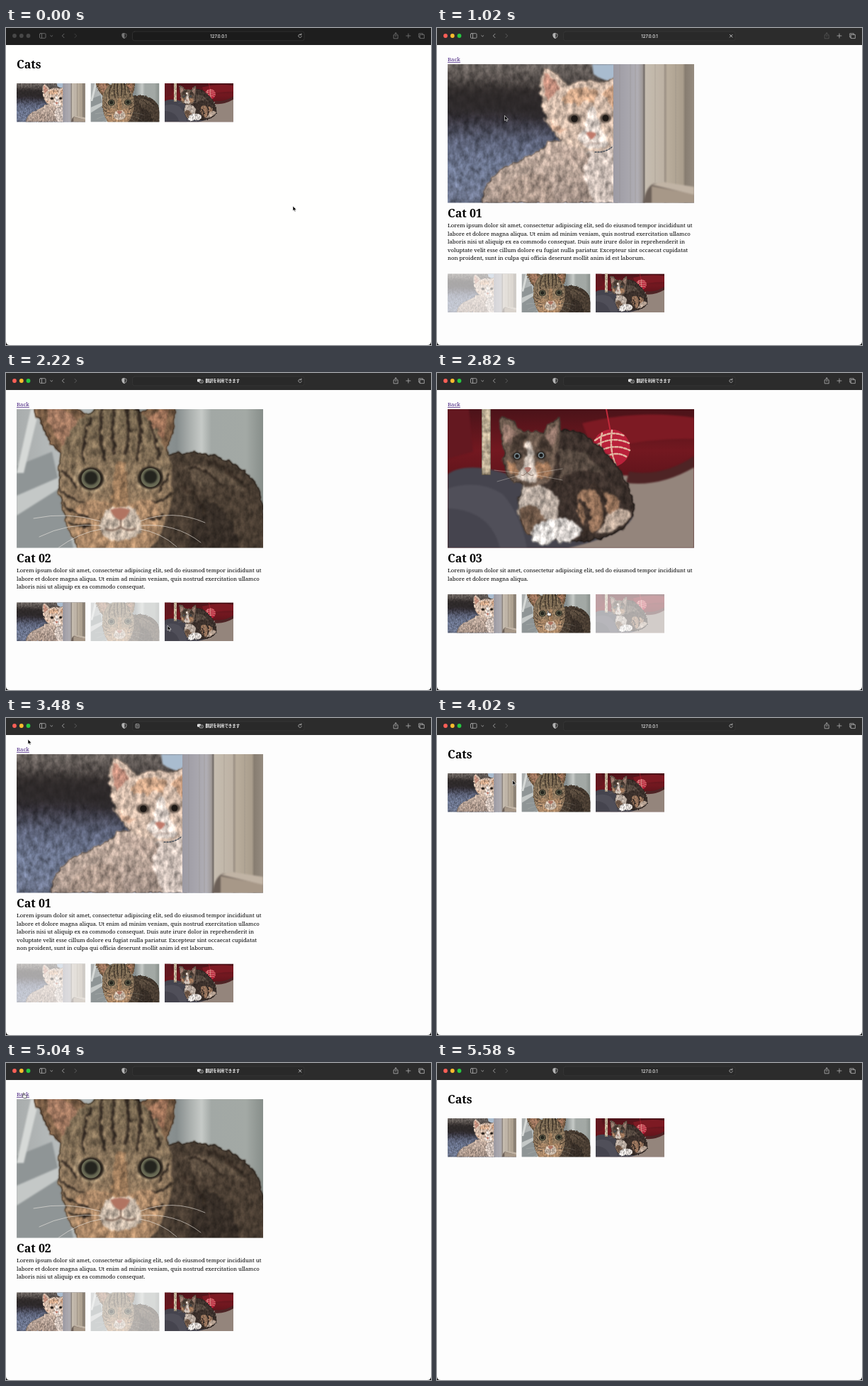
Write an HTML page that moves like this. It is 600 px wide and 447 px high and loops after 5640 ms.

```html
<!DOCTYPE html>
<html lang="en">
<head>
<meta charset="utf-8">
<title>Cats</title>
<style>
  html, body { margin: 0; width: 100%; height: 100%; overflow: hidden; background: #111; }
  svg { display: block; width: 100vw; height: 100vh; }
  filter { color-interpolation-filters: sRGB; }
  .page { font: 7.8px "Noto Serif", "Liberation Serif", serif; fill: #000; }
  .page .h { font-size: 16px; font-weight: 600; }
  .page .back { fill: #46217f; text-decoration: underline; }
  .bar { fill: none; stroke: #b4b4b4; stroke-width: .8; stroke-linecap: round; stroke-linejoin: round; }
  .bar text { fill: #f2f2f2; stroke: none; text-anchor: middle; font: 500 6px Inter, "Liberation Sans", sans-serif; }
  .bar .jp { font: 700 5.4px "Noto Sans CJK JP", "Noto Sans CJK", sans-serif; text-anchor: start; }
  .line { fill: none; stroke-linecap: round; }
</style>
</head>
<body>
<svg viewBox="0 0 600 447" preserveAspectRatio="none">
  <defs>
    <filter id="soft" x="-10%" y="-10%" width="120%" height="120%"><feGaussianBlur stdDeviation="1.3"/></filter>
    <filter id="haze" x="-20%" y="-20%" width="140%" height="140%"><feGaussianBlur stdDeviation="6"/></filter>
    <!-- Ragged edges and a light and dark mottle, like fur. -->
    <filter id="fur" x="-5%" y="-5%" width="110%" height="110%">
      <feTurbulence type="fractalNoise" baseFrequency=".13 .09" numOctaves="3" seed="4" result="noise"/>
      <feColorMatrix in="noise" values="1 0 0 0 0  1 0 0 0 0  1 0 0 0 0  0 0 0 0 1" result="gray"/>
      <feDisplacementMap in="SourceGraphic" in2="noise" scale="9" xChannelSelector="R" yChannelSelector="G"/>
      <feGaussianBlur stdDeviation="1.1" result="shape"/>
      <feComposite in="shape" in2="gray" operator="arithmetic" k1=".9" k2=".55"/>
    </filter>
    <linearGradient id="yard" x2="0" y2="1">
      <stop offset="0" stop-color="#7b7470"/><stop offset=".1" stop-color="#615a56"/>
      <stop offset=".22" stop-color="#3a3433"/><stop offset=".4" stop-color="#35323a"/>
      <stop offset=".55" stop-color="#5a6076"/><stop offset=".7" stop-color="#6c7690"/>
      <stop offset="1" stop-color="#6a7289"/>
    </linearGradient>
    <linearGradient id="wall">
      <stop offset="0" stop-color="#9c9aa3"/><stop offset=".3" stop-color="#b0aeb4"/>
      <stop offset=".36" stop-color="#a09a98"/><stop offset=".38" stop-color="#716a66"/>
      <stop offset=".4" stop-color="#c6bdb0"/><stop offset=".62" stop-color="#bdb2a4"/>
      <stop offset=".64" stop-color="#9c9185"/><stop offset=".67" stop-color="#b9ad9c"/>
      <stop offset=".86" stop-color="#aa9e8d"/><stop offset=".89" stop-color="#877d71"/>
      <stop offset="1" stop-color="#968c80"/>
    </linearGradient>
    <linearGradient id="coat" x2="0" y2="1">
      <stop offset="0" stop-color="#c9b3a5"/><stop offset="1" stop-color="#a08e84"/>
    </linearGradient>
    <linearGradient id="pane">
      <stop offset="0" stop-color="#a9adad"/><stop offset=".2" stop-color="#b9bebe"/>
      <stop offset=".65" stop-color="#868d8d"/><stop offset=".7" stop-color="#a8adab"/>
      <stop offset=".75" stop-color="#c6cac7"/><stop offset=".79" stop-color="#a2a8a5"/>
      <stop offset=".93" stop-color="#a3a9a5"/><stop offset="1" stop-color="#878e8a"/>
    </linearGradient>
    <linearGradient id="tabby" x2="0" y2="1">
      <stop offset="0" stop-color="#75664f"/><stop offset=".5" stop-color="#88735a"/>
      <stop offset="1" stop-color="#a48263"/>
    </linearGradient>
    <linearGradient id="sofa" x2="0" y2="1">
      <stop offset="0" stop-color="#4b1319"/><stop offset=".3" stop-color="#731820"/>
      <stop offset=".55" stop-color="#5a131a"/><stop offset="1" stop-color="#3d1216"/>
    </linearGradient>

    <symbol id="cat1" viewBox="0 0 348 195.5" preserveAspectRatio="none">
      <rect x="-10" y="-10" width="368" height="216" fill="url(#yard)" filter="url(#fur)"/>
      <path d="M0 34Q70 28 150 44V84Q70 62 0 72Z" fill="#2a2626" opacity=".7" filter="url(#haze)"/>
      <path d="M204 0H236V26Q216 22 206 14Z" fill="#a9bccf" filter="url(#soft)"/>
      <g filter="url(#fur)">
        <path d="M46 196C50 164 78 144 104 134C126 125 138 118 142 108L240 106V196Z" fill="url(#coat)"/>
        <path d="M196 118L240 112V196H208Q184 154 196 118Z" fill="#cdbfb7"/>
        <path d="M70 196Q82 160 122 152Q152 156 150 196" fill="#ad988a" opacity=".6"/>
        <path d="M134 62C129 36 130 12 136 3C148 6 160 18 168 30C186 20 206 20 218 28Q228 20 236 20V112C222 126 206 126 190 120C162 114 140 96 134 62Z" fill="#d2baa9"/>
        <path d="M136 12Q152 20 160 35Q148 42 141 54Q134 34 136 12Z" fill="#bd8a79"/>
        <path d="M162 44Q182 27 212 36L206 60Q198 42 184 60Q174 50 162 58Z" fill="#c9a184"/>
        <path d="M220 40Q230 28 236 30V62Q224 56 220 40Z" fill="#cba184"/>
        <path d="M142 72Q152 92 170 92Q158 102 150 94Z" fill="#c6a18a"/>
        <path d="M198 62Q206 58 210 66L216 92Q230 102 224 114Q206 124 188 112Q178 102 194 92Z" fill="#ded2ca"/>
        <path d="M142 112Q168 124 200 126L198 140Q160 136 142 112Z" fill="#b49f93"/>
      </g>
      <g fill="#5a4d44" filter="url(#soft)"><ellipse cx="178.500" cy="77" rx="9" ry="7"/><ellipse cx="223" cy="76" rx="8" ry="6.500"/></g>
      <g fill="#1e1916"><circle cx="179" cy="77" r="4.800"/><circle cx="223" cy="76" r="4.500"/></g>
      <g filter="url(#soft)">
        <path d="M195 97Q203 93 210 98Q206 106 202 106Z" fill="#c07a6b"/>
        <path class="line" d="M202 106V110Q196 115 190 112M202 110Q208 114 215 111" stroke="#a78c80"/>
      </g>
      <path class="line" d="M208 124Q222 125 232 117" stroke="#4c535d" stroke-width="1.500" stroke-dasharray="2 2"/>
      <rect x="234" width="114" height="196" fill="url(#wall)"/>
      <path class="line" d="M243 0V196M258 0V196M265 0V196M293 0V166M322 0V170" stroke="#887f7a" stroke-width=".6" opacity=".5"/>
      <g filter="url(#soft)">
        <path d="M276 196Q280 172 292 168L348 174V196Z" fill="#6c6058"/>
        <path d="M288 172L348 183V196H288Z" fill="#a79888"/>
        <path d="M288 170L304 166L348 173V184Z" fill="#c1b4a5"/>
      </g>
    </symbol>

    <symbol id="cat2" viewBox="0 0 348 195.5" preserveAspectRatio="none">
      <rect width="348" height="196" fill="url(#pane)"/>
      <g filter="url(#soft)">
        <path d="M0 80L50 60L80 196H0Z" fill="#8f9596"/>
        <path d="M0 122L60 96V112L0 150Z" fill="#c4c8c7"/>
        <path d="M20 0H32L10 90H0Z" fill="#d6d9d7"/>
      </g>
      <g filter="url(#fur)">
        <path d="M206 66C260 50 318 70 342 112Q352 150 352 206H190Z" fill="#493d32"/>
        <path d="M238 80Q290 72 326 120Q298 98 262 112Z" fill="#5c4e40"/>
        <path d="M254 128Q300 124 318 206H240Z" fill="#372e27"/>
        <path d="M64 66Q32 34 24 -10H62Q92 -2 110 20Z" fill="#7b5f47"/>
        <path d="M66 50Q44 28 40 -6H58Q82 10 92 24Z" fill="#a0775f"/>
        <path d="M164 12Q190 -6 222 -10Q228 30 206 70Z" fill="#7b5f47"/>
        <path d="M180 14Q198 2 212 0Q214 32 200 50Z" fill="#a0745a"/>
        <path d="M62 64C70 24 106 -6 140 -8C176 -6 206 32 218 76C226 124 214 164 184 206H94C66 170 52 112 62 64Z" fill="url(#tabby)"/>
        <path d="M84 136Q116 120 145 140Q176 122 200 132Q208 168 180 206H98Q76 164 84 136Z" fill="#a98666"/>
        <path d="M122 150Q134 132 147 134Q162 132 172 150Q182 168 168 180Q148 192 124 180Q110 168 122 150Z" fill="#c9b9a9"/>
        <path d="M140 76Q146 70 154 76L158 138H132Z" fill="#9c7a5a"/>
        <path d="M80 88Q106 74 128 96Q126 118 104 118Q84 112 80 88Z" fill="#9c876b"/>
        <path d="M168 94Q188 74 212 84Q212 110 188 116Q168 114 168 94Z" fill="#9c876b"/>
        <g class="line" stroke="#352b23" stroke-width="4.500">
          <path d="M122 0Q114 38 124 72M138 -4Q132 34 139 62M154 -4Q162 34 154 62M170 0Q180 38 170 70"/>
          <path d="M104 12Q92 42 94 74M188 18Q200 48 200 70" stroke-width="4"/>
          <path d="M64 88Q78 94 84 112M62 112Q74 128 92 130M66 134Q80 150 100 152M216 92Q206 104 202 116M220 116Q208 130 194 130M76 160Q90 166 104 164M206 150Q196 158 186 154" stroke-width="3"/>
          <path d="M244 82Q272 84 286 106M270 74Q300 82 320 108M232 108Q258 118 266 150" stroke-width="4"/>
        </g>
      </g>
      <g fill="#2b241d" filter="url(#soft)"><ellipse cx="105" cy="98" rx="18" ry="16"/><ellipse cx="189" cy="96.500" rx="18" ry="16"/></g>
      <g fill="#696a54"><circle cx="105" cy="98" r="13.500"/><circle cx="189" cy="96.500" r="13.500"/></g>
      <g fill="#24241e" filter="url(#soft)"><circle cx="105" cy="97" r="9.500"/><circle cx="189" cy="95.500" r="9.500"/></g>
      <g filter="url(#soft)">
        <path d="M132 142Q146 136 160 142Q156 154 147 157Q137 154 132 142Z" fill="#b17461"/>
        <path class="line" d="M147 156V166Q136 174 126 169M147 166Q158 174 168 168" stroke="#73594b" stroke-width="2"/>
      </g>
      <g class="line" stroke="#eee9e2" stroke-width=".8" opacity=".75">
        <path d="M118 158Q72 144 24 154M118 164Q72 160 32 180M120 169Q88 174 58 196M174 158Q220 140 266 160M176 164Q224 160 260 188M174 169Q204 174 226 194"/>
      </g>
    </symbol>

    <symbol id="cat3" viewBox="0 0 348 195.5" preserveAspectRatio="none">
      <rect width="348" height="196" fill="url(#sofa)"/>
      <g filter="url(#soft)">
        <path d="M190 20Q270 0 348 12V42Q280 40 206 60Z" fill="#7d1a23"/>
        <path d="M230 92Q300 100 348 72V196H130Z" fill="#94857c"/>
        <path d="M256 88Q304 96 348 66V82Q300 110 252 104Z" fill="#4e2425"/>
        <path d="M0 0H30L36 60L0 70Z" fill="#641820"/>
        <path d="M0 92C22 74 70 84 96 96L262 150Q254 176 170 196H0Z" fill="#45444e"/>
        <path d="M0 112Q44 98 78 120Q104 150 112 196H74Q60 142 0 140Z" fill="#504f59"/>
      </g>
      <g filter="url(#fur)">
        <path d="M49 -4L60 88" class="line" stroke="#a99980" stroke-width="40"/>
        <path d="M49 -4L60 88" fill="none" stroke="#c6b79e" stroke-width="41" stroke-dasharray="5 2.500"/>
      </g>
      <path d="M224 0L230 32" class="line" stroke="#c1293a" stroke-width="2"/>
      <circle cx="231" cy="55" r="26.500" fill="#b9213a"/>
      <g class="line" stroke="#e2b5a0" stroke-width="2.500" stroke-dasharray="4 2.500">
        <path d="M208 44Q230 28 250 38M205 54Q230 36 256 48M206 64Q232 46 257 58M212 73Q236 56 254 68"/>
        <path d="M218 34Q212 56 226 79M232 30Q228 58 238 80"/>
      </g>
      <g filter="url(#fur)">
        <path d="M136 36C172 20 202 34 224 64C250 86 266 120 262 150C250 180 202 190 150 186C110 184 96 156 100 124Z" fill="#3b302b"/>
        <path d="M156 56Q202 54 222 94Q184 76 160 100Z" fill="#574a41"/>
        <path d="M184 116Q220 104 244 132Q240 162 204 174Q178 158 184 116Z" fill="#95725a"/>
        <path d="M206 108Q230 126 218 172M188 130Q204 146 194 174" class="line" stroke="#3a2e28" stroke-width="7"/>
        <path d="M226 148Q256 132 260 150Q244 172 212 176Z" fill="#b9a596"/>
        <path d="M104 106Q144 104 158 130L150 180Q108 178 98 144Z" fill="#b5a89e"/>
        <path d="M100 138Q128 128 140 160L134 186Q102 180 100 138Z" fill="#6f5848"/>
        <path d="M118 168Q150 144 164 164Q158 190 130 192Q114 184 118 168Z" fill="#e2dedb"/>
        <path d="M154 154Q184 152 188 172Q182 190 156 188Q146 170 154 154Z" fill="#dad4d0"/>
        <path d="M80 60Q72 28 76 10Q94 16 104 32Q122 28 134 34Q148 14 158 12Q162 42 152 68Q156 98 132 108Q108 114 90 100Q72 84 80 60Z" fill="#6b594d"/>
        <path d="M79 19Q91 23 98 37L84 50Q76 34 79 19ZM155 22Q156 42 148 54L138 40Q146 24 155 22Z" fill="#94776b"/>
        <path d="M92 40Q102 32 110 36L106 58L88 62ZM132 38Q148 44 148 60L126 58Z" fill="#473a32"/>
        <path d="M84 72Q98 78 104 96Q86 98 84 72ZM124 76Q150 72 146 92Q136 102 122 94Z" fill="#a3795b"/>
        <path d="M112 46Q118 44 120 56L123 82Q134 96 122 104Q104 106 96 93Q108 84 109 72Z" fill="#cdc0b6"/>
      </g>
      <g fill="#29231f" filter="url(#soft)"><ellipse cx="98" cy="66" rx="7" ry="6"/><ellipse cx="132" cy="65" rx="7" ry="6"/></g>
      <g fill="#76858b"><circle cx="98" cy="66" r="4.300"/><circle cx="132" cy="65" r="4.300"/></g>
      <g fill="#191919"><circle cx="98" cy="66" r="2.600"/><circle cx="132" cy="65" r="2.600"/></g>
      <path d="M108 83Q113 80 118 83Q116 89 112 89Z" fill="#b07a70"/>
      <path class="line" d="M112 89Q108 95 104 93M112 89Q116 95 121 93" stroke="#8a7467"/>
      <path class="line" d="M102 90L66 86M102 93L70 102M126 90L162 84M126 93L162 100" stroke="#ece5de" stroke-width=".6" opacity=".6"/>
    </symbol>
  </defs>

  <path id="paper" d="M0 20H600V442Q600 447 595 447H5Q0 447 0 442Z"/>
  <g id="pages" class="page"></g>
  <g id="images"></g>

  <g class="bar">
    <rect id="strip" width="600" height="24" stroke="none"/>
    <g id="lights" stroke="none"><circle cx="12" cy="11" r="2.900"/><circle cx="21.800" cy="11" r="2.900"/><circle cx="31.500" cy="11" r="2.900"/></g>
    <rect id="field" x="178.500" y="5" width="242.500" height="12.800" rx="3" stroke="#3c3c3c" stroke-width=".6"/>
    <g id="icons">
      <rect x="47.500" y="7.700" width="8.500" height="6.600" rx="1.200"/>
      <path d="M50.500 8V14M62.800 10.600L64.300 12L65.800 10.600M82 8.300L79.300 11L82 13.700"/>
      <path d="M97 8.300L99.700 11L97 13.700" stroke="#666"/>
      <path d="M167 7.600L170 8.600V11Q170 13.600 167 14.600Q164 13.600 164 11V8.600Z"/>
      <path d="M167 7.600V14.600Q164 13.600 164 11V8.600Z" fill="#b4b4b4"/>
    </g>
    <path id="reload" d="M416.800 9.500A2.300 2.300 0 1 0 417.400 11.600M417 7.800V9.700H415"/>
    <path id="stop" d="M413.400 9.400L417 13M417 9.400L413.400 13" stroke="#ddd"/>
    <g id="tools">
      <path d="M548.600 9.800H547.200V14.800H553.200V9.800H551.800M550.200 12V6.800M548.600 8.300L550.200 6.700L551.800 8.300"/>
      <path d="M568 8V14M565 11H571"/>
      <path d="M584.400 13H582.800V7.800H588.400V9.200M584.600 9.400H590.400V14.600H584.600Z"/>
    </g>
    <g id="reader"><rect x="183" y="8.600" width="5" height="5.400" rx=".8"/><path d="M184.300 10.500H186.700M184.300 12H186.700" stroke-width=".6"/></g>
    <text id="host" x="300" y="13.600">127.0.0.1</text>
    <g id="translate">
      <rect x="270" y="8.400" width="5" height="4" rx="1" fill="#eee" stroke="none"/>
      <rect x="273.200" y="10" width="5" height="4" rx="1" fill="#2c2c2c" stroke="#eee" stroke-width=".6"/>
      <path d="M271.500 10.400H273M274.800 12.800L275.700 11L276.600 12.800" stroke="#999" stroke-width=".5"/>
      <text class="jp" x="281.500" y="13.200">翻訳を利用できます</text>
    </g>
    <path id="progress" d="M181 17.500H418" stroke="#2f8fd8" stroke-width="1.200"/>
  </g>

  <g id="cursor">
    <path id="arrow" d="M0 0V7L1.600 5.600L2.700 8L3.900 7.500L2.800 5.200H5Z" fill="#000" stroke="#fff" stroke-width=".6"/>
    <path id="hand" d="M0 .6Q.7 -.4 1.400 .6V3L4.600 3.700Q5.300 4 5.100 5L4.500 7.600H1L-1.400 4.700Q-1.300 3.700 0 4.600Z" fill="#fff" stroke="#111" stroke-width=".6"/>
  </g>
</svg>
<script>
const LOOP = 5640, STEP = 60, MORPH = 300;
const $ = id => document.getElementById(id);
const LINES = [
  "Lorem ipsum dolor sit amet, consectetur adipiscing elit, sed do eiusmod tempor incididunt ut",
  "labore et dolore magna aliqua. Ut enim ad minim veniam, quis nostrud exercitation ullamco",
  "laboris nisi ut aliquip ex ea commodo consequat. Duis aute irure dolor in reprehenderit in",
  "voluptate velit esse cillum dolore eu fugiat nulla pariatur. Excepteur sint occaecat cupidatat",
  "non proident, sunt in culpa qui officia deserunt mollit anim id est laborum."
];
const LINE_COUNT = [0, 5, 3, 2];
const ROW_Y = [78, 346.5, 323.5, 312];
const HERO = [15, 51, 348, 195.5];

// Page 0 is the list, pages 1 to 3 show one cat each.
const VISITS = [[640, 1], [1860, 2], [2420, 3], [3040, 1], [3680, 0], [4260, 2], [5040, 0]];
const PATH = [
  [60, 405, 251], [540, 95.5, 123.5], [1260, 95.5, 123.5], [1680, 167, 365], [2040, 167, 365],
  [2360, 270, 350], [2500, 270, 350], [2820, 156, 335], [2980, 70, 338], [3180, 70, 338],
  [3480, 31, 30], [3600, 24, 42], [3800, 24, 42], [4180, 158, 116], [4800, 158, 116], [5000, 24, 42]
];
const SPANS = {
  hand: [[480, 660], [2280, 2480], [2760, 3100], [3600, 3700], [4080, 4280], [4960, 5080]],
  stop: [[660, 1980], [2420, 2640], [3040, 3240], [4320, 4860], [5040, 5220]],
  dim: [[660, 1980]],
  translate: [[1500, 3720], [4500, 5080]],
  reader: [[3360, 3720]],
  progress: [[4440, 4740]]
};

const within = (name, t) => SPANS[name].some(([a, b]) => t >= a && t < b);
const show = (id, on) => $(id).style.display = on ? "" : "none";
const mix = (a, b, k) => a + (b - a) * k;
const smooth = k => k * k * (3 - 2 * k);

function bezier(x1, y1, x2, y2) {
  const at = (a, b, s) => 3 * a * s * (1 - s) ** 2 + 3 * b * s * s * (1 - s) + s ** 3;
  return x => {
    let lo = 0, hi = 1;
    for (let i = 0; i < 20; i++) {
      const mid = (lo + hi) / 2;
      if (at(x1, x2, mid) < x) lo = mid; else hi = mid;
    }
    return at(y1, y2, lo);
  };
}
const ease = bezier(.25, .1, .25, 1);

function add(parent, tag, attrs, text = "") {
  const el = document.createElementNS("http://www.w3.org/2000/svg", tag);
  for (const key in attrs) el.setAttribute(key, attrs[key]);
  el.textContent = text;
  return parent.appendChild(el);
}
function place(el, [x, y, width, height]) {
  Object.entries({ x, y, width, height }).forEach(([k, v]) => el.setAttribute(k, v));
}
const thumb = (cat, page) => [15 + 104.5 * (cat - 1), ROW_Y[page], 97, 54.4];
const spot = (cat, page) => cat === page ? HERO : thumb(cat, page);

const pages = [0, 1, 2, 3].map(p => {
  const g = add($("pages"), "g", {});
  if (!p) {
    add(g, "text", { class: "h", x: 15, y: 56.5 }, "Cats");
    return g;
  }
  add(g, "text", { class: "back", x: 15, y: 47.3 }, "Back");
  add(g, "text", { class: "h", x: 15, y: 267 }, "Cat 0" + p);
  const count = LINE_COUNT[p];
  LINES.slice(0, count).forEach((line, i) => {
    const text = i === count - 1 ? line.slice(0, line.indexOf(".") + 1) : line;
    add(g, "text", { x: 15, y: 281 + 11.55 * i }, text);
  });
  const ghost = add(g, "use", { href: "#cat" + p, opacity: .4 });
  place(ghost, thumb(p, p));
  return g;
});
const cats = [1, 2, 3].map(c => add($("images"), "use", { href: "#cat" + c }));

function drawPages(t) {
  let from = 0, to = 0, start = -MORPH;
  for (const [time, page] of VISITS) {
    if (t >= time) [from, to, start] = [to, page, time];
  }
  const k = ease(Math.min(1, (t - start) / MORPH));
  pages.forEach((g, p) => {
    const alpha = from === to ? +(p === to) : p === to ? k : p === from ? 1 - k : 0;
    g.style.opacity = alpha;
    g.style.display = alpha > .002 ? "" : "none";
  });
  cats.forEach((el, i) => {
    const a = spot(i + 1, from), b = spot(i + 1, to);
    place(el, a.map((v, n) => mix(v, b[n], k)));
  });
}

function drawBar(t) {
  const active = t >= 240;
  $("strip").setAttribute("fill", active ? "#2c2c2c" : "#1e1e1e");
  $("field").setAttribute("fill", active ? "#292929" : "#1b1b1b");
  $("paper").setAttribute("fill", active ? "#fdfdfd" : "#fffffe");
  const colors = active ? ["#fe5f57", "#febc2e", "#28c840"] : ["#484848", "#484848", "#484848"];
  [...$("lights").children].forEach((el, i) => el.setAttribute("fill", colors[i]));
  $("icons").style.opacity = active ? 1 : .6;
  $("tools").style.opacity = active ? 1 : .6;
  $("tools").firstElementChild.style.opacity = within("dim", t) ? .3 : 1;
  const loading = within("stop", t), translated = within("translate", t);
  show("stop", loading);
  show("reload", !loading);
  show("translate", translated);
  show("host", !translated);
  show("reader", within("reader", t));
  show("progress", within("progress", t));
}

function drawCursor(t) {
  const n = PATH.findIndex(key => key[0] > t);
  const b = n < 0 ? PATH[PATH.length - 1] : PATH[n];
  const a = n > 0 ? PATH[n - 1] : b;
  const k = a === b ? 1 : smooth((t - a[0]) / (b[0] - a[0]));
  $("cursor").setAttribute("transform", `translate(${mix(a[1], b[1], k)} ${mix(a[2], b[2], k)})`);
  const hand = within("hand", t);
  show("hand", hand);
  show("arrow", !hand);
  show("cursor", t < 5340);
}

const origin = performance.now();
let last = -1;
function tick() {
  const now = Math.max(0, performance.now() - origin) % LOOP;
  const t = Math.floor(now / STEP) * STEP;
  if (t !== last) {
    last = t;
    drawPages(t);
    drawBar(t);
    drawCursor(t);
  }
  requestAnimationFrame(tick);
}
tick();
</script>
</body>
</html>
```
